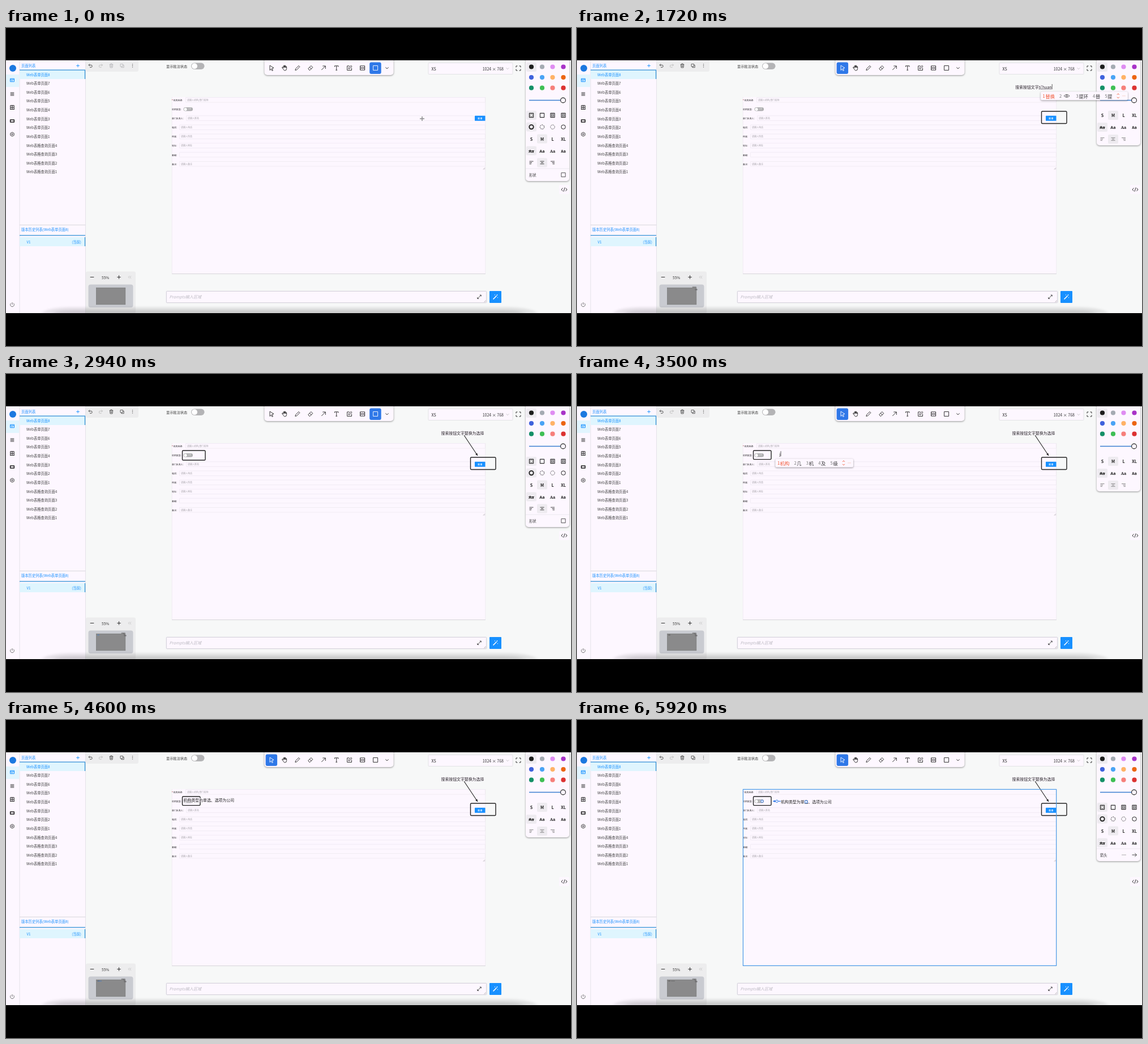
An HTML page that plays this animation: 998x561 px, repeating every 5.94 s.

```html
<!DOCTYPE html>
<html lang="zh">
<head>
<meta charset="utf-8">
<style>
html, body { margin: 0; width: 100%; height: 100%; overflow: hidden; background: #000 }
svg { display: block; width: 998px; height: 561px; font-family: "Noto Sans CJK SC", "Noto Sans CJK", "Noto Sans", sans-serif }
text { dominant-baseline: central; white-space: pre }
.lift { filter: drop-shadow(0 1px 1.5px #0006) }
.halo { paint-order: stroke; stroke: #fdf7ff; stroke-width: 1px }
</style>
</head>
<body>
<svg viewBox="0 0 998 561">
  <defs>
    <clipPath id="screen"><path d="M0 57H998V503H0Z"/></clipPath>
    <filter id="soft" x="-5%" y="-100%" width="110%" height="300%"><feGaussianBlur stdDeviation="2.2"/></filter>
  </defs>
  <g clip-path="url(#screen)"><g id="base"></g><g id="live"></g></g>
</svg>
<script>
const LOOP = 5940, PAPER = '#fdf7ff', BLUE = '#1890ff', TOOL = '#2f78e8', INK = '#222';

const rect = (x, y, w, h, fill, r = 0, attr = '') =>
  `<rect x="${x}" y="${y}" width="${w}" height="${h}" fill="${fill}" rx="${r}" ${attr}/>`;
const text = (x, y, s, size, fill = '#333', attr = '') =>
  `<text x="${x}" y="${y}" font-size="${size}" fill="${fill}" ${attr}>${s}</text>`;
const dot = (x, y, r, fill, attr = '') => `<circle cx="${x}" cy="${y}" r="${r}" fill="${fill}" ${attr}/>`;
const path = (d, color = INK, w = 1, attr = '') =>
  `<path d="${d}" fill="none" stroke="${color}" stroke-width="${w}" stroke-linejoin="round" ${attr}/>`;
const icon = (x, y, d, color = INK, w = 1) => path(d, color, w, `transform="translate(${x} ${y})"`);
const mid = 'text-anchor="middle"';

const SQUARE = 'M-3.6-3.6H3.6V3.6H-3.6Z';
const TOOLS = [
  'M-3-4.5L4 0 .8 1 2.5 4.2 1 5-.6 1.9-3 4Z',
  'M-2.5 1.8-4.3-.6q0-1.4 1.3-.7L-2 0V-3.5q.7-1 1.4 0V-1-4.2q.7-1 1.4 0V-1-3.7q.7-1 1.4 0V-.5-2.2q.8-1 1.5 0V1q0 3.6-3.2 3.6Q-.8 4.6-2.5 1.8Z',
  'M-4 4-3.3 1.3 2.2-4 4-2.2-1.3 3.3Z',
  'M-4 1 1-4 4-1-1.2 4H-2ZM-1.7-1.4 1.5 1.6',
  'M-3.5 3.5 3.5-3.5M-1.5-3.5H3.5V1.5',
  'M-3.3-2V-3.7H3.3V-2M0-3.7V3.8M-1.4 3.8H1.4',
  'M0-3.6H-4V4H3.8V0M-1.5 1.5V-.3L2.8-4.2 4.3-2.8 0 1.5Z',
  'M-4-3.7H4V3.7H-4ZM-4 2.2-1.5 0M4 2.2 1.5 0M-4-2 -2-.5M4-2 2-.5M0-1.6 1.6 0 0 1.6-1.6 0Z',
  'M-4-4H4V4H-4Z',
  'M-2.6-1.2 0 1.4 2.6-1.2'
];
const COLORS = ['#1d1d1d', '#a5abb3', '#df8cf2', '#a832c8', '#3f62dc', '#4aa3f5',
  '#ffb267', '#ec6412', '#159068', '#3fbf55', '#f67f7b', '#dc3131'];
const COLS = [928, 947, 965.5, 984.5];

function drawBase() {
  let s = rect(0, 57, 998, 446, '#f7f8f8') + rect(0, 57, 140, 446, PAPER);

  // Icon rail
  s += dot(12, 71, 6, '#1c78e0') + rect(0, 82, 23, 22, '#e2f5fe');
  s += icon(11, 92, 'M-3.5-2.7H3.5V2.7H-3.5ZM-3.5-.8H3.5M-1.8 1H.5', BLUE)
    + icon(11, 116.5, 'M-3.3-2.4H3.3M-3.3 0H3.3M-3.3 2.4H3.3')
    + icon(11, 140, 'M-3.2 3.4V-3.4H3.2V3.4M-4 3.4H4M0-3.4V3.4M-3.2 0H3.2')
    + icon(11, 164, 'M-3.3-2H3.3V2H-3.3Z', INK, 1.6)
    + icon(11, 187.5, 'M0-3.6 3.2-1.8V1.8L0 3.6-3.2 1.8V-1.8Z', '#444')
    + dot(11, 187.5, 1.2, 'none', 'stroke="#444"')
    + icon(11, 488, 'M-2-2.6a3.4 3.4 0 1 0 4 0M0-4V0', '#555', .8);

  // Page list
  s += path('M24 57V503M140.5 57V503', '#e4e2e8', 1);
  s += text(27, 66.5, '页面列表', 6.3, BLUE) + icon(127, 66.5, 'M-2.8 0H2.8M0-2.8V2.8', BLUE, .9);
  s += rect(24, 75, 116, 15, '#dff5fe') + path('M24 74.2H140M139.5 74V90', '#2b8fd6', 1.2);
  for (let i = 0; i < 12; i++) {
    const name = i < 8 ? `Web表单页面${8 - i}` : `Web表格查询页面${12 - i}`;
    s += text(36, 82 + i * 15.63, name, 6.3, i ? '#444' : BLUE);
  }
  s += path('M24 347.5H140', '#d8d8dc') + text(27, 355.5, '版本历史列表(Web表单页面8)', 6.3, BLUE);
  s += rect(24, 369, 116, 16, '#dff5fe') + path('M24 365.8H140M139.5 369V385', '#2b8fd6', 1.2);
  s += text(36.5, 377, 'V1', 6.3, BLUE) + text(133, 377, '(当前)', 6.3, BLUE, 'text-anchor="end"');

  // Top bar
  s += rect(141, 50, 93, 27, '#ededee', 3);
  s += text(283, 67, '显示批注状态', 6.2) + rect(327, 61.5, 23.5, 11.5, '#b4b4b6', 5.8) + dot(333, 67.2, 5, '#fff');
  s += rect(456.5, 50, 228, 33, PAPER, 5, 'class="lift"');
  s += rect(746, 61.5, 149, 20, PAPER, 1, 'stroke="#e3e3e6"')
    + text(751.5, 71.5, 'XS', 7, INK, 'font-weight="500"') + text(879, 71.5, '1024 × 768', 7, '#333', 'text-anchor="end"')
    + icon(886, 71.5, 'M-2.4-1.2 0 1.2 2.4-1.2', '#bbb', .8);
  s += icon(905, 71, 'M-4-1.5V-4H-1.5M1.5-4H4V-1.5M4 1.5V4H1.5M-1.5 4H-4V1.5', '#333');
  s += rect(977, 277, 18, 16, PAPER, 2) + icon(986, 285, 'M-2.5-2.8-5 0-2.5 2.8M2.5-2.8 5 0 2.5 2.8M1-3.6-1 3.6', '#333');

  // Form
  s += rect(293, 122, 554, 311.5, PAPER) + path('M293 433.7H847', '#d5d3d8') + path('M293.3 122V433M846.7 122V433', '#e9e6ec', .6);
  const rows = [['* 机构名称:', '请输入机构/部门名称', 320], ['机构类型:', '', 0], ['部门负责人：', '请输入姓名', 321],
    ['电话：', '请输入电话', 309], ['传真：', '请输入传真', 309], ['地址：', '请输入地址', 309], ['邮编：', '', 309], ['备注：', '请输入备注', 309]];
  rows.forEach(([label, hint, x], i) => {
    const y = 126.8 + i * 16.13;
    s += text(293, y, label, 3.9, '#222', 'font-weight="500"') + text(x, y, hint, 4, '#a3a0a6');
    if (x) s += rect(x - 2.5, y - 4.3, (i === 2 ? 826 : 846.5) - x + 2.5, 8.6, 'none', .5, 'stroke="#ece7ef" stroke-width=".7"');
  });
  s += text(293, 126.8, '*', 3.9, '#e33');
  s += rect(313.5, 140, 16.5, 6.6, '#aeaeb0', 3.3) + dot(317, 143.3, 2.6, '#fff') + text(321, 143.3, '公司', 3, '#fff');
  s += rect(828, 154.8, 18.5, 9, BLUE, .6) + text(837.3, 159.2, '搜 索', 3.6, '#fff', mid + ' font-weight="700"');
  s += path('M843 249.5 846 246.5M845 249.5 846 248.5', '#888', .6);

  // Zoom and minimap
  s += rect(141, 429.5, 88, 74, '#ededee', 3) + icon(152, 439.5, 'M-3.3 0H3.3', '#333')
    + text(175.7, 439.7, '55%', 6.6, '#333', mid) + icon(199.5, 439.5, 'M-3.2 0H3.2M0-3.2V3.2', '#333')
    + icon(218.5, 439.5, 'M-.2-2.2-2.4 0-.2 2.2M2.6-2.2.4 0 2.6 2.2', '#bbb', .8);
  s += rect(145.5, 452.5, 79, 40.5, '#c9cbd1', 4) + rect(159.5, 458.3, 51.3, 29.5, '#8a8a8b', 0, 'stroke="#777" stroke-width=".7"');

  // Prompt
  s += rect(283.3, 464.3, 565.4, 20.4, PAPER, 1, 'stroke="#cfccd6"')
    + text(288.5, 474.2, 'Prompts输入区域', 7.1, '#bdbac2', 'font-style="italic"')
    + icon(836, 474.3, 'M-3.2 3.2 3.2-3.2M.8-3.2H3.2V-.8M-.8 3.2H-3.2V.8', '#333', .9)
    + path('M844.5 483.5 847.5 480.5M846.5 483.5 847.5 482.5', '#888', .6);
  s += rect(854, 464, 21, 21, BLUE, 1) + icon(864.5, 474.5, 'M-4 4 2-2', '#fff', 1.6)
    + icon(864.5, 474.5, 'M3-4.5V-2.5M2-3.5H4M-1-4.5V-2.9M4 .2V1.8', '#fff', .8);

  // Shade along the lower edge
  s += `<g filter="url(#soft)"><path d="M62 503Q75 494 110 493H890Q925 494 940 503Z" fill="#000" opacity=".1"/>
    <path d="M80 505Q90 499 120 499H880Q910 499 920 505Z" fill="#000" opacity=".12"/></g>`;
  return s;
}

function toolbar(active) {
  return rect(642.2 - (8 - active) * 22.95, 60.5, 20.5, 20.5, TOOL, 3) +
    TOOLS.map((d, i) => icon(i < 9 ? 469 + i * 22.95 : 673, 70.5, d, i === active ? '#fff' : INK, .9)).join('');
}

function panel(mode) {
  const bottom = { geo: 270, text: 207, arrow: 249 }[mode], full = mode !== 'text';
  const pick = (x, y) => rect(x - 9, y - 8, 18, 16, '#eeebf0', 2);
  let s = rect(918, 50, 77, bottom - 50, PAPER, 5, 'class="lift"') + pick(928, 69);
  COLORS.forEach((c, i) => s += dot(COLS[i % 4], 68.5 + (i >> 2) * 18.6, 4.1, c));
  s += path('M924 127.5H980', '#3a7fd0', 1.4) + dot(984, 127.5, 4.4, PAPER, 'stroke="#222" stroke-width="1.1"');
  let y = 154;
  if (full) {
    s += pick(928, 154) + pick(928, 174.6);
    COLS.forEach((x, i) => {
      s += icon(x, 154, SQUARE, '#333', 1.1);
      if (i !== 1) s += rect(x - 2, 152, 4, 4, i ? '#a9a9ac' : '#fff', 0, 'stroke="#555" stroke-width=".7"');
      const dash = ['', 'stroke-dasharray="2 1.3"', 'stroke-dasharray=".8 .8"', ''][i];
      s += dot(x, 174.6, 3.7, 'none', `stroke="#222" stroke-width="${i ? 1 : 1.9}" ${dash}`);
    });
    y = 195.5;
  }
  s += pick(947, y) + pick(928, y + 21);
  COLS.forEach((x, i) => {
    s += text(x, y, ['S', 'M', 'L', 'XL'][i], 7.2, INK, mid + ' font-weight="700"');
    const family = ['Noto Sans', 'Noto Sans', 'Noto Serif', 'Noto Sans Mono'][i];
    s += text(x, y + 21, 'Aa', 7.2, INK, `${mid} font-weight="600" style="font-family:'${family}',sans-serif"`);
  });
  s += path(`M923 ${y + 21}H933`, INK, .8);
  if (mode !== 'arrow') {
    const ink = full ? '#333' : '#777';
    s += pick(947, y + 42);
    [[0, -1], [-2, 0], [0, 1]].forEach(([, side], i) => {
      const short = [[-3.5, 1], [-2, 2], [-1, 3.5]][i];
      s += icon(COLS[i], y + 42, `M-3.5-2.3H3.5M${short[0]} 0H${short[1]}M${i === 2 ? 0 : -3.5} 2.3H${i === 0 ? 0 : 3.5}`, ink, .9);
    });
  }
  if (full) {
    s += path(`M918 ${bottom - 22}H995`, '#e6e2ea', .8) + text(924, bottom - 11, mode === 'geo' ? '形状' : '箭头', 6.3);
    s += mode === 'geo' ? icon(984.5, 259, SQUARE, '#444', .9)
      : icon(966, 238, 'M-4 0H4', '#999', .8) + icon(984.5, 238, 'M-4 0H4M.8-3 4 0 .8 3', '#333', .9);
  }
  return s;
}

// Each word: result, typed letters, start, end, candidates
const NOTE_A = [
  ['搜索', "sou'suo", 800, 1240, '搜 瞍 艘 馊 廋'], ['按钮', "an'niu", 1260, 1400, '按钮 按 安 案 暗'],
  ['文字', "wen'zi", 1420, 1550, '文字 文 问 闻 温'], ['替换', "ti'huan", 1570, 1740, '替换 eye 提环 替 提'],
  ['为', 'wei', 1790, 1860, '为 位 未 围 喂'], ['选择', "xuan'ze", 1880, 2060, '选择 选 宣 旋 悬']];
const NOTE_B = [
  ['机构', "ji'gou", 3500, 3620, '机构 几 机 及 级'], ['类型', "lei'xing", 3640, 3760, '类型 类 雷 累 泪'],
  ['为', 'wei', 3770, 3820, '为 位 未 围 喂'], ['单选', "dan'xuan", 3840, 3980, '单选 但 单 蛋 淡'],
  ['、', '', 4020, 4020, ''], ['选项', "xuan'xiang", 4120, 4300, '选项 选 宣 旋 悬'],
  ['为', 'wei', 4310, 4360, '为 位 未 围 喂'], ['公司', "gong'si", 4380, 4540, '公司 公 工 共 供']];

const meter = document.createElement('canvas').getContext('2d');
meter.font = '6.9px "Noto Sans CJK SC", "Noto Sans CJK", "Noto Sans", sans-serif';
const width = s => meter.measureText(s).width;

function candidates(x, y, list) {
  let s = '', at = x + 3.5;
  list.split(' ').forEach((word, i) => {
    const eye = word === 'eye', n = eye ? 2 : word.length;
    s += text(at, y, i + 1, 7.6, i ? '#777' : '#f0512d');
    s += eye ? icon(at + 13, y, 'M-5 0Q0-5 5 0 0 5-5 0ZM-1.5 0a1.5 1.5 0 1 0 3 0a1.5 1.5 0 1 0-3 0', '#555', .9)
      : text(at + 4.9, y, word, 8.2, i ? '#333' : '#f0512d');
    at += 13 + 8.1 * n + .3;
  });
  s += icon(at + 2, y, 'M-2-2 0-4 2-2M-2 2 0 4 2 2', '#f0512d', .9) + icon(at + 12, y, 'M-3 0H3', '#f7d4cc');
  return rect(x, y - 7.5, at - x + 19, 15, PAPER, 2.5, 'class="lift"') + s;
}

function note(t, words, x, y, begin, end) {
  if (t < begin) return ['', ''];
  const done = words.filter(w => t >= w[3]).map(w => w[0]).join('');
  const word = words.find(w => t >= w[2] && t < w[3]);
  const typed = word ? word[1].slice(0, Math.ceil((t - word[2]) / (word[3] - word[2]) * word[1].length)) : '';
  let s = text(x, y, `${done}<tspan text-decoration="underline">${typed}</tspan>`, 6.9, INK, mid + ' class="halo"');
  if (t < end) {
    const cx = x + width(done + typed) / 2 + .7;
    s += path(`M${cx} ${y - 4.5}V${y + 4.5}`, INK, .7);
  }
  return [s, typed && candidates(x - 8 + width(done) / 2, y + 16.3, word[4])];
}

const ease = (t, a, b) => { const p = Math.min(1, Math.max(0, (t - a) / (b - a))); return p * p * (3 - 2 * p); };
const lerp = (a, b, p) => a + (b - a) * p;
const cross = (x, y) => icon(x, y, 'M-4 0H4M0-4V4', '#fff', 2.4) + icon(x, y, 'M-4 0H4M0-4V4', '#8d8a90', 1.5);
const box = (x, y, w, h) => rect(x, y, w, h, 'none', 1.6, `stroke="${INK}" stroke-width="1.4"`);

function selection(x, y, w, h) {
  let s = rect(x, y, w, h, 'none', 0, `stroke="${TOOL}" stroke-width=".8"`);
  for (const px of [x, x + w]) for (const py of [y, y + h])
    s += rect(px - 1.7, py - 1.7, 3.4, 3.4, '#fff', 0, `stroke="${TOOL}" stroke-width=".8"`);
  return s;
}

function arrow(x1, y1, x2, y2, color = INK) {
  const a = Math.atan2(y2 - y1, x2 - x1);
  const wing = d => `${x2 - 4.5 * Math.cos(a + d)} ${y2 - 4.5 * Math.sin(a + d)}`;
  return path(`M${x1} ${y1}L${x2} ${y2}`, color, 1.1) + `<path d="M${wing(.45)}L${x2} ${y2}L${wing(-.45)}Z" fill="${color}"/>`;
}

const handle = (x, y) => dot(x, y, 2.1, '#fff', `stroke="${TOOL}" stroke-width="1"`);

// Start time, active tool, style panel
const MODES = [[0, 8, 'geo'], [500, 0, 'geo'], [640, 0, 'text'], [2150, 4, 'arrow'], [2450, 0, 'arrow'],
  [2600, 8, 'geo'], [3000, 0, 'geo'], [3440, 0, 'text'], [5000, 4, 'arrow'], [5600, 0, 'arrow']];

function drawLive(t) {
  const [, tool, mode] = MODES.filter(m => t >= m[0]).pop();
  const edited = t > 250 ? '#444' : '#b5b5b8';
  let s = icon(149, 66.5, 'M-1-3.2-3 -1.2-1 .8M-3-1.2H1q2.2 0 2.2 2T1 2.8H-1', '#444', .9)
    + icon(167.5, 66.5, 'M1-3.2 3-1.2 1 .8M3-1.2H-1q-2.2 0-2.2 2T-1 2.8H1', '#bbb', .9)
    + icon(186, 66.5, 'M-3.3-2.2H3.3M-1.2-2.2V-3.4H1.2V-2.2M-2.5-2.2-2 3.4H2L2.5-2.2M-.7-.5V1.8M.7-.5V1.8', edited, .9)
    + icon(205, 66.5, 'M-3-3H1.4V1.4H-3ZM-1.2 1.4V3.2H3.2V-1.2H1.4', edited, .8)
    + [-2.6, 0, 2.6].map(d => dot(223.5, 66.5 + d, .7, '#555')).join('');
  s += toolbar(tool);

  let shapes = '', mini = '', ime = '';
  const mark = (x, y, w, h, fill) => mini += rect(x, y, w, h, fill);

  // First outline with its note and arrow
  if (t < 250) s += cross(lerp(735, 820.5, ease(t, 20, 250)), lerp(160, 147, ease(t, 20, 250)));
  else {
    const p = ease(t, 250, 480), w = 44.5 * p, h = 21.5 * p;
    shapes += box(820.5, 147, w, h);
    if (t >= 500 && t < 640) shapes += selection(820.5, 147, w, h);
    mark(208.3, 460.5, 4.2 * p, 2 * p, '#6d6d6f');
  }
  const a = note(t, NOTE_A, 806.4, 103.5, 640, 2130);
  shapes += a[0];
  ime += a[1];
  if (t > 1200) mark(203.7, 456.6, 7, 1, '#555');
  if (t > 2200) {
    const p = ease(t, 2200, 2420), x = lerp(809, 833, p), y = lerp(108, 144, p);
    shapes += arrow(809, 108, x, y);
    if (t > 2450 && t < 2600) shapes += handle(809, 108) + handle(821, 126) + handle(833, 144);
    mini += path('M207.3 457 209.5 460.5', '#555', .7);
  }

  // Second outline
  if (t > 2600 && t < 2700) shapes += cross(lerp(560, 311.5, ease(t, 2600, 2700)), 135);
  if (t >= 2700) {
    const p = ease(t, 2700, 2920), q = ease(t, 3120, 3350);
    const w = lerp(40.5, 31.5, q) * p, h = lerp(17, 15.6, q) * p;
    shapes += box(311.5, 135, w, h);
    if (t > 3000 && t < 3440) shapes += selection(311.5, 135, w, h);
    mark(161.2, 459.6, 3.6 * p, 1.6 * p, t < 3440 ? '#5d86b8' : '#666');
  }
  const m = ease(t, 4720, 4960);
  const b = note(t, NOTE_B, lerp(358.4, 405, m), lerp(140.6, 144, m), 3460, 4580);
  shapes += b[0];
  ime += b[1];
  if (t > 3600) mark(lerp(162, 166, m), 460, 7, .8, t > 4580 && t < 5000 ? '#4478bd' : '#666');
  if (t > 4640 && t < 5000) shapes += selection(lerp(312.5, 359.3, m), lerp(135.6, 139, m), 91.8, 10);

  // Second arrow
  if (t > 5300) {
    shapes += arrow(360, 143.3, lerp(360, 346, ease(t, 5300, 5550)), 143.3, t > 5600 ? TOOL : INK);
    if (t > 5600) {
      shapes += rect(293.4, 122.4, 553.3, 311, 'none', 0, 'stroke="#4b9be8" stroke-width="1.2"');
      shapes += handle(327, 143.3) + handle(353, 143.3)
        + rect(402.7, 142.2, 4.2, 4.2, '#fff', .6, `stroke="${TOOL}" stroke-width="1"`);
    }
  }
  return s + mini + shapes + panel(mode) + ime;
}

document.getElementById('base').innerHTML = drawBase();
const live = document.getElementById('live'), start = performance.now();
function frame() {
  live.innerHTML = drawLive((performance.now() - start) % LOOP);
  requestAnimationFrame(frame);
}
frame();
</script>
</body>
</html>
```
